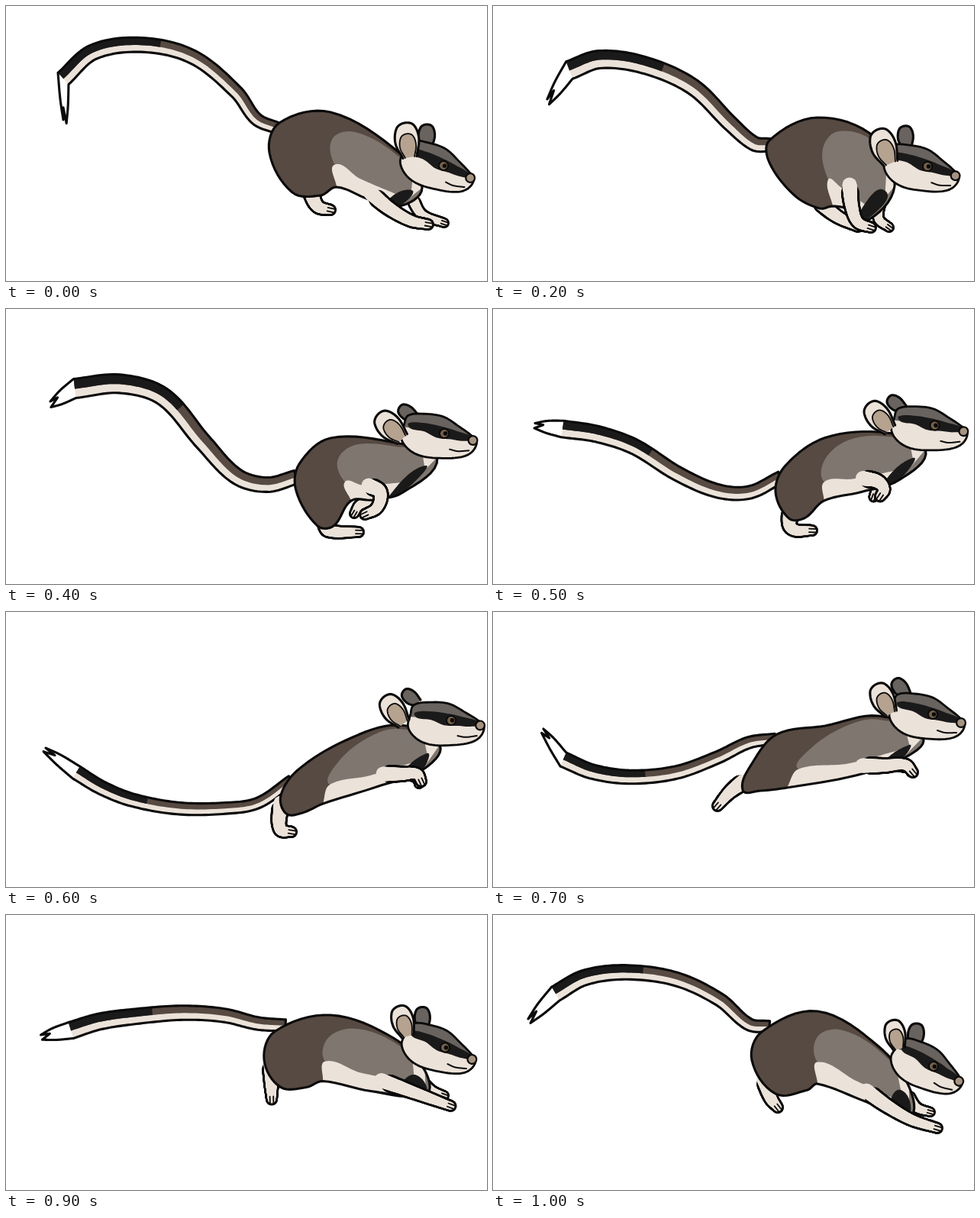
Animation, 630 px wide and 360 px high, one loop 1.1 s. Source, as an HTML page with a canvas:

```html
<!DOCTYPE html>
<html>
<head>
<meta charset="utf-8">
<style>
html, body { margin: 0; width: 630px; height: 360px; overflow: hidden; background: #fff; }
canvas { display: block; }
</style>
</head>
<body>
<canvas id="stage" width="630" height="360"></canvas>
<script>
const g = document.getElementById('stage').getContext('2d');
const INK = '#0b0a0a', BROWN = '#574a42', GREY = '#7e766f', CREAM = '#ebe2d9', BLACK = '#1b1a1a', CROWN = '#69635f', TAN = '#b5a28f';
const STEP = 100, STEPS = 11, N = 80;

// Joints of a small rig; steps between two poses are blended.
// head: eye, then turn in degrees and tail girth. ears: root and tip.
// body: tail, crest, neck, throat, chest, belly, groin, thigh front, thigh back, rump.
const poses = {
  0: { head: '573,209 8,9', ear: '529,198 522,153', farEar: '551,186 551,155',
    tail: '356,160 328,148 302,113 245,67 180,51 115,60 75,95', tip: '75,149',
    body: '358,153 425,139 515,192 545,238 515,262 475,253 433,237 412,248 375,244 345,192',
    foot: '398,240 408,262 425,267', arm: '478,245 502,265 530,281 553,286', farArm: '532,252 545,273 574,284' },
  2: { head: '569,210 2,10.5', ear: '521,206 503,162', farEar: '542,186 539,157',
    tail: '362,182 342,180 311,154 262,106 200,78 140,70 100,84', tip: '71,122',
    body: '362,176 425,146 500,172 526,236 486,283 465,266 445,262 428,265 395,248 362,205',
    foot: '425,254 450,275 478,289', arm: '467,234 470,262 478,283 495,290', farArm: '508,250 505,278 519,290' },
  4: { head: '574,163 -3,11', ear: '519,170 487,138', farEar: '537,143 515,129',
    tail: '380,220 342,230 302,219 258,174 206,115 150,98 90,104', tip: '58,121',
    body: '384,203 425,169 515,176 565,194 520,240 480,250 452,251 429,284 408,284 380,238',
    foot: '418,278 423,290 462,292', arm: '475,231 490,240 486,260 470,269', farArm: '474,256 464,256 456,268' },
  6: { head: '583,142 -7,8', ear: '521,146 495,111', farEar: '540,119 520,104',
    tail: '374,220 330,250 285,257 225,257 165,246 125,230 92,210', tip: '52,178',
    body: '382,207 445,168 515,148 568,174 545,207 485,229 415,251 388,263 367,264 360,240',
    foot: '360,250 359,284 374,288', arm: '494,212 518,212 538,212 544,222', farArm: '530,212 540,218 541,225' },
  7: { head: '576,134 0,8.5', ear: '521,133 501,95', farEar: '543,110 525,89',
    tail: '370,166 335,171 295,190 240,210 180,216 130,209 92,193', tip: '66,153',
    body: '372,160 435,149 505,136 563,164 535,193 475,214 385,230 350,234 327,233 340,197',
    foot: '328,222 310,236 294,254', arm: '484,201 512,201 540,200 550,210', farArm: '530,200 545,204 548,210' },
  8: { head: '573,149 0,10', ear: '521,142 505,101', farEar: '540,127 534,99',
    tail: '370,143 325,141 275,152 225,172 170,190 125,197 88,199', tip: '45,178',
    body: '352,152 425,136 510,150 552,182 555,205 465,216 405,214 375,222 348,216 337,188',
    foot: '339,176 331,205 323,231', arm: '494,203 528,206 560,211 583,221', farArm: '545,202 562,209 575,215' },
  10: { head: '577,198 14,9', ear: '532,175 522,138', farEar: '553,172 555,142',
    tail: '362,146 335,143 297,111 240,84 175,75 120,82 82,103', tip: '46,136',
    body: '352,153 425,126 505,172 545,225 545,264 490,245 425,221 412,229 370,234 339,190',
    foot: '355,215 364,240 373,252', arm: '489,230 515,249 548,268 582,279', farArm: '542,234 555,252 573,258' }
};

const parse = text => text.split(' ').map(s => s.split(',').map(Number));
const mix = (a, b, t) => a + (b - a) * t;
const between = (p, q, t) => [mix(p[0], q[0], t), mix(p[1], q[1], t)];
const blend = (ps, qs, t) => ps.map((p, i) => between(p, qs[i], t));

const face = {
  skull: parse('-52,-14 -46,-26 -24,-27 0,-22 20,-8 36,5 42,13 35,26 20,32 -6,32 -31,28 -48,18 -57,2'),
  crown: parse('-56,-14 -30,-10 10,-3 38,8 50,-10 0,-42 -60,-40'),
  mask: parse('-46,-16 -25,-15 -5,-10 15,-3 38,9 24,11 8,8 -10,5 -26,-4 -44,-9'),
  mouth: parse('6,21 16,24 31,24')
};
// Ear outline as shares of its length: sideways, upwards.
const earShape = parse('-.2,0 -.35,.45 -.25,.88 0,1 .25,.9 .34,.5 .2,0');

// Smooth curve through the points, sampled evenly over its spans.
function curve(pts, closed = false) {
  const n = pts.length, spans = closed ? n : n - 1;
  const at = i => pts[closed ? (i + n) % n : Math.max(0, Math.min(n - 1, i))];
  const heading = i => {
    const a = at(i - 1), b = at(i + 1), d = Math.hypot(b[0] - a[0], b[1] - a[1]) || 1;
    return [(b[0] - a[0]) / d, (b[1] - a[1]) / d];
  };
  return Array.from({ length: N + 1 }, (_, k) => {
    const u = k / N * spans, i = Math.min(Math.floor(u), spans - 1), t = u - i;
    const a = at(i), b = at(i + 1), p = heading(i), q = heading(i + 1);
    const len = Math.hypot(b[0] - a[0], b[1] - a[1]), s = t * t * (3 - 2 * t);
    return [0, 1].map(c => mix(a[c], b[c], s) + len * (p[c] * t * (1 - t) ** 2 - q[c] * t * t * (1 - t)));
  });
}

function trace(pts, closed) {
  g.beginPath();
  pts.forEach(p => g.lineTo(p[0], p[1]));
  if (closed) g.closePath();
}
function fill(pts, color) { trace(pts, true); g.fillStyle = color; g.fill(); }
function line(pts, closed, width = 3.1) { trace(pts, closed); g.lineWidth = width; g.stroke(); }
function shape(pts, color, closed = true) { fill(pts, color); line(pts, closed); }
function dot(x, y, r, color) { g.beginPath(); g.arc(x, y, r, 0, 7); g.fillStyle = color; g.fill(); }
function inside(pts, paint) { g.save(); trace(pts, true); g.clip(); paint(); g.restore(); }

// Tapered limb, left open where it joins the body, with two toe lines.
function limb(joints, from, to) {
  const path = curve(joints), first = Math.round(N * 0.12);
  const beads = (start, rim, color) => {
    for (let i = start; i <= N; i++) dot(...path[i], mix(from, to, i / N) + rim, color);
  };
  beads(first, 1.5, INK);
  beads(0, -1.5, CREAM);
  const [x, y] = path[N], back = path[N - 6], a = Math.atan2(y - back[1], x - back[0]);
  g.save();
  g.translate(x, y);
  g.rotate(a);
  for (const side of [-1, 1]) line([[-4, side * to * 0.35], [to, side * to * 0.35]], false, 1.8);
  g.restore();
}

function drawTail({ tail, tip: [tip], head }) {
  const mid = curve(tail), girth = head[1][1];
  const edge = side => mid.map((p, i) => {
    const a = mid[Math.max(0, i - 1)], b = mid[Math.min(N, i + 1)];
    const w = side * girth * mix(0.8, 1.15, i / N) / Math.hypot(b[0] - a[0], b[1] - a[1]);
    return [p[0] - (b[1] - a[1]) * w, p[1] + (b[0] - a[0]) * w];
  });
  const top = edge(1), low = edge(-1), seam = blend(top, low, 0.52);
  const a = top[N], b = low[N], end = mid[N];
  const bulge = (p, q, out) => between(between(p, q, 0.5), [p[0] + q[0] - end[0], p[1] + q[1] - end[1]], out);
  const fork = [tip[0] + (b[0] - a[0]) * 0.3, tip[1] + (b[1] - a[1]) * 0.3];
  const tuft = [...curve([a, bulge(a, tip, 0.15), tip]), between(tip, end, 0.3), ...curve([fork, bulge(b, fork, 0.1), b])];
  const rim = [...top, ...tuft, ...low.slice().reverse()];
  const band = (k, color) => fill([...top.slice(k), ...seam.slice(k).reverse()], color);
  fill(rim, CREAM);
  fill(tuft, '#fff');
  band(0, BROWN);
  band(Math.round(N * 0.61), BLACK);
  line(rim, true);
}

function drawBody(joints) {
  const [, crest, neck, throat, chest, belly, groin] = joints;
  const outline = curve(joints, true);
  const shoulder = between(between(crest, neck, 0.35), belly, 0.08);
  const flank = between(belly, crest, 0.24), hip = between(groin, crest, 0.3);
  const collar = between(throat, belly, 0.2);
  fill(outline, BROWN);
  inside(outline, () => {
    fill(curve([hip, between(crest, groin, 0.35), shoulder, between(neck, belly, 0.06), throat, chest, belly], true), GREY);
    fill([...curve([groin, hip, flank, between(chest, neck, 0.2)]), chest, belly], CREAM);
    fill([between(throat, neck, 0.4), throat, chest, collar], CREAM);
    fill(curve([collar, between(chest, belly, 0.45), chest], true), BLACK);
  });
  line(outline, true);
}

function ear([root, tip], color) {
  const dx = tip[0] - root[0], dy = tip[1] - root[1];
  const at = size => curve(earShape.map(([s, u]) =>
    [root[0] + (dx * u - dy * s) * size, root[1] + (dy * u + dx * s) * size]));
  shape(at(1), color, false);
  return at;
}

function drawHead({ head: [[x, y], [turn]], ear: near, farEar }) {
  const skull = curve(face.skull, true);
  ear(farEar, CROWN);
  g.save();
  g.translate(x, y);
  g.rotate(turn * Math.PI / 180);
  fill(skull, CREAM);
  inside(skull, () => {
    fill(curve(face.crown, true), CROWN);
    fill(curve(face.mask, true), BLACK);
  });
  line(skull, true, 2.8);
  dot(0, 0, 7, INK);
  dot(0, 0, 5, '#75604a');
  dot(1.5, 0, 2.8, INK);
  dot(37, 11, 7, INK);
  dot(37, 11, 4.8, '#a59380');
  line(curve(face.mouth), false, 2);
  g.restore();
  const inner = ear(near, CREAM)(0.68);
  fill(inner, TAN);
  line(inner, false, 1.8);
}

function poseAt(step) {
  const slots = Object.keys(poses).map(Number), to = slots.find(s => s >= step);
  const from = slots.filter(s => s <= step).pop(), t = (step - from) / (to - from || 1);
  const out = {};
  for (const key in poses[to]) out[key] = blend(parse(poses[from][key]), parse(poses[to][key]), t);
  return out;
}

function draw(pose) {
  g.fillStyle = '#fff';
  g.fillRect(0, 0, 630, 360);
  g.strokeStyle = INK;
  g.lineJoin = g.lineCap = 'round';
  limb(pose.farArm, 8, 5.5);
  drawTail(pose);
  limb(pose.foot, 11, 6.5);
  drawBody(pose.body);
  limb(pose.arm, 11, 6.5);
  drawHead(pose);
}

const start = performance.now();
function tick() {
  draw(poseAt(Math.floor(Math.max(0, performance.now() - start) / STEP) % STEPS));
  requestAnimationFrame(tick);
}
tick();
</script>
</body>
</html>
```
